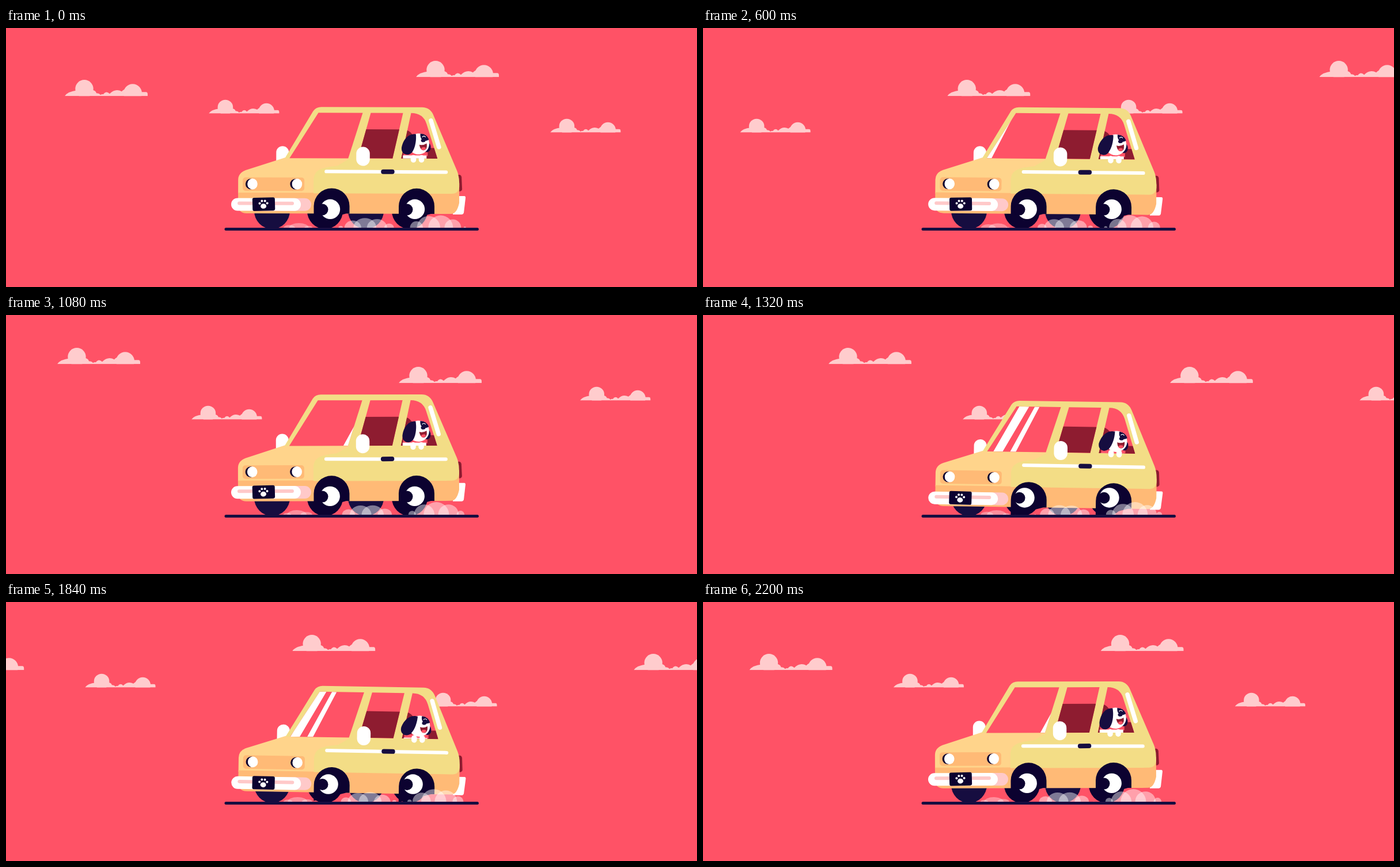
An HTML page that plays this animation: 1200x450 px, repeating every 2240 ms.

```html
<!DOCTYPE html>
<html lang="en">
<head>
<meta charset="utf-8">
<title>Puppy road trip</title>
<style>
  html, body { margin: 0; width: 100%; height: 100%; overflow: hidden; background: #ff5266; }
  svg { display: block; width: 100%; height: 100%; }
  .sky { fill: #ffcccd; }
  .glass { fill: #ff5266; }
  .cream { fill: #ffd48b; }
  .orange { fill: #ffba76; }
  .yellow { fill: #f3dd86; }
  .white { fill: #fff; }
  .pink { fill: #ffc9c9; }
  .maroon { fill: #8e1c30; }
  .navy { fill: #160d40; }
  .ink { fill: #0c0230; }
  .stripe { stroke: #fff; stroke-linecap: round; }
</style>
</head>
<body>
<svg viewBox="0 0 1200 450" aria-label="A puppy riding in a small car">
  <defs>
    <clipPath id="cloudClip"><rect y="-2" width="145" height="30"/></clipPath>
    <clipPath id="roadClip"><rect width="1200" height="347"/></clipPath>
    <clipPath id="windshield"><path id="windshieldShape" d="M542 162H619L594 241H492Z"/></clipPath>
    <clipPath id="sideWindows"><path id="sideShape" d="M633 162H689L671 241H611ZM703 162Q724 162 730 181L749 241H686Z"/></clipPath>

    <g id="cloud" class="sky" clip-path="url(#cloudClip)">
      <path d="M0 28Q5 20 22 18L46 17Q54 18 55 23Q60 23 62 26Q65 24 67 25Q72 18 78 24Q88 14 99 20Q104 14 112 17L130 21H141Q144 21 144 25V28Z"/>
      <circle cx="34" cy="15.5" r="15.7"/>
      <circle cx="118" cy="23" r="16"/>
    </g>
    <circle id="hub" class="white" r="17.2"/>
    <g id="lamp">
      <circle class="ink" cx="-2" r="9.3"/>
      <ellipse class="white" cx=".8" rx="8.8" ry="9.4"/>
    </g>
    <path id="arch" class="ink" d="M-31 28V0A31 31 0 0 1 31 0V13H25Z"/>
  </defs>

  <rect width="1200" height="450" class="glass"/>
  <g id="clouds"></g>

  <g class="navy"><circle cx="462" cy="318" r="31"/><circle cx="625" cy="318" r="31"/></g>
  <g class="ink"><circle cx="554" cy="318" r="31"/><circle cx="701" cy="318" r="31"/></g>

  <g id="car">
    <path class="white" d="M780 306L796 306Q798 306 798 309L795 335Q794 338 791 338H776Z"/>
    <path class="maroon" d="M778 269H787Q790 269 791 273L792 294Q792 297 788 298H780Z"/>
    <rect class="white" x="469" y="220" width="22" height="36" rx="11"/>
    <path class="cream" d="M403 315V279Q403 267 416 262L484 240H600V303H403Z"/>
    <path class="orange" d="M403 301H760V284H787V318Q783 337 773 337H418Q403 337 403 322Z"/>
    <path class="yellow" d="M534 302V280C534 262 545 257 575 254L597 241H484L533 159Q538 152 547 152H722Q736 152 742 166L783 262Q787 272 787 284V290Q786 302 774 302Z"/>

    <use href="#windshieldShape" class="glass"/>
    <g clip-path="url(#windshield)">
      <path id="glare" class="white" d="M578 162H595L550 241H534ZM605 162H613L573 241H563Z"/>
    </g>
    <use href="#sideShape" class="glass"/>
    <g clip-path="url(#sideWindows)">
      <g id="seat">
        <path class="maroon" d="M600 197H690Q704 198 709 214L735 229H760V270H600Z"/>
        <path class="glass" d="M690 236H732V243H690Z"/>
        <path class="white" d="M689 242H730V270H689Z"/>
      </g>
    </g>
    <path d="M737.5 175L751.5 221" class="stripe" stroke-width="7.5"/>

    <g id="head">
      <ellipse class="navy" cx="731" cy="229" rx="7" ry="9"/>
      <ellipse class="white" cx="718" cy="221.5" rx="18.5" ry="18.2"/>
      <path class="navy" d="M724 204.500Q735 207 737 217Q731 220 726 216Q722 212 724 204.500Z"/>
      <path d="M726 211Q730 208 732 212" fill="none" stroke="#fff" stroke-width="1.2"/>
      <ellipse class="navy" cx="727" cy="217" rx="4" ry="3"/>
      <path class="maroon" d="M719 223Q725 226 732 223Q732 234 725 234Q719 233 719 223Z"/>
      <ellipse class="glass" cx="725" cy="231" rx="4" ry="2.5"/>
      <path id="ear" class="navy" d="M715 203C699 203 693 220 693 230C694 242 707 243 712 235C717 226 717 212 715 203Z"/>
    </g>
    <g class="white">
      <rect x="702.5" y="235" width="9.5" height="13" rx="4.7"/>
      <rect x="716.5" y="235" width="9.5" height="13" rx="4.7"/>
    </g>

    <path d="M556 264L764 264.5" class="stripe" stroke-width="6"/>
    <rect class="navy" x="651" y="260" width="23.5" height="8" rx="4"/>
    <rect class="white" x="608" y="221" width="23.5" height="33" rx="11.7"/>

    <rect class="orange" x="411" y="274.5" width="107" height="23.5" rx="5"/>
    <use href="#lamp" x="427" y="286"/>
    <use href="#lamp" x="504.5" y="286"/>

    <use href="#arch" x="565.5" y="324"/>
    <use href="#arch" x="713" y="324"/>

    <g id="bumper">
      <rect class="pink" x="440" y="313" width="90" height="22" rx="11"/>
      <rect class="white" x="391" y="313" width="121" height="22" rx="11"/>
      <rect class="pink" x="402" y="319" width="98" height="6" rx="3"/>
      <g id="plate">
        <rect class="ink" x="427" y="312" width="39" height="23" rx="3"/>
        <g class="white">
          <ellipse cx="446" cy="327" rx="5" ry="4.3"/>
          <circle cx="439.5" cy="322" r="2"/>
          <circle cx="443.5" cy="318" r="2"/>
          <circle cx="448.8" cy="318" r="2"/>
          <circle cx="452.7" cy="322" r="2"/>
        </g>
      </g>
    </g>
  </g>

  <g id="hubs">
    <use href="#hub" x="557.5" y="319.5"/>
    <use href="#hub" x="704.5" y="319.5"/>
  </g>
  <g id="axles" class="ink">
    <circle cx="549.5" cy="319.5" r="10"/>
    <circle cx="696.5" cy="319.5" r="10"/>
  </g>

  <g id="smoke" class="white" clip-path="url(#roadClip)"></g>
  <rect class="navy" x="379.5" y="347" width="441.5" height="5" rx="2.5"/>
</svg>

<script>
const FRAME = 40, LOOP = 2240, BOUNCE = 560, LAP = 1203;
const $ = id => document.getElementById(id);
const move = (id, value) => $(id).setAttribute('transform', value);

function add(parent, tag, attrs) {
  const node = document.createElementNS('http://www.w3.org/2000/svg', tag);
  for (const key in attrs) node.setAttribute(key, attrs[key]);
  return $(parent).appendChild(node);
}

// Each cloud leaves on the right while its twin arrives from the left.
const clouds = [
  { x: 102, y: 90.3, size: 1, speed: LAP / LOOP },
  { x: 712, y: 57.3, size: 1, speed: 0.597 },
  { x: 352, y: 124.8, size: 0.85, speed: 0.597 },
  { x: 945, y: 157.8, size: 0.85, speed: 0.609 }
].flatMap(c => [c, { ...c, x: c.x - LAP, speed: LAP / LOOP }])
 .map(c => ({ ...c, node: add('clouds', 'use', { href: '#cloud' }) }));

const puffs = [
  { x: 482, drift: 50, rx: 17, ry: 8, count: 3, shift: 0.2, alpha: 0.35 },
  { x: 575, drift: 105, rx: 20, ry: 17, count: 5, shift: 0.06, alpha: 0.45 },
  { x: 695, drift: 105, rx: 22, ry: 22, count: 5, shift: 0.17, alpha: 0.45 }
].flatMap(e => Array.from({ length: e.count }, (_, i) => ({
  ...e, shift: e.shift + i / e.count,
  node: add('smoke', 'ellipse', { cy: 347, opacity: e.alpha })
})));

const wave = (phase, peak) => Math.cos(2 * Math.PI * (phase - peak) / BOUNCE);

function draw(time) {
  const t = Math.floor(time / FRAME) * FRAME % LOOP;
  const phase = t % BOUNCE;
  const lift = (1 + wave(phase, 0)) / 2;
  const softLift = Math.sqrt(lift);
  const tilt = 0.25 + 0.7 * wave(phase, 150);

  for (const c of clouds)
    c.node.setAttribute('transform', `translate(${c.x + c.speed * t} ${c.y}) scale(${c.size})`);

  move('car', `translate(0 ${0.5 - 15 * lift}) rotate(${tilt} 600 338)`);
  move('glare', `translate(${0.26 * (phase - 320)} 0)`);
  move('seat', `translate(0 ${-6.5 * lift})`);
  move('head', `translate(${-1.5 * lift - 1.5 * tilt} ${-6 * lift}) rotate(${-10 * softLift} 718 222)`);
  move('ear', `rotate(${14 * tilt + 14 * softLift} 712 208)`);
  move('bumper', `translate(0 ${-2.5 * softLift})`);
  move('plate', `translate(${lift} 0) rotate(${1.5 - 3 * lift} 446 323)`);
  move('hubs', `translate(${5.5 * lift} ${-4.7 * softLift})`);
  move('axles', `translate(0 ${-4 * softLift})`);

  for (const p of puffs) {
    const age = (phase / BOUNCE + p.shift) % 1;
    const grow = Math.sin(Math.PI * age);
    p.node.setAttribute('cx', p.x + p.drift * age);
    p.node.setAttribute('rx', p.rx * grow);
    p.node.setAttribute('ry', p.ry * grow);
  }
}

const start = performance.now();
function tick() {
  draw(performance.now() - start);
  requestAnimationFrame(tick);
}
tick();
</script>
</body>
</html>
```
